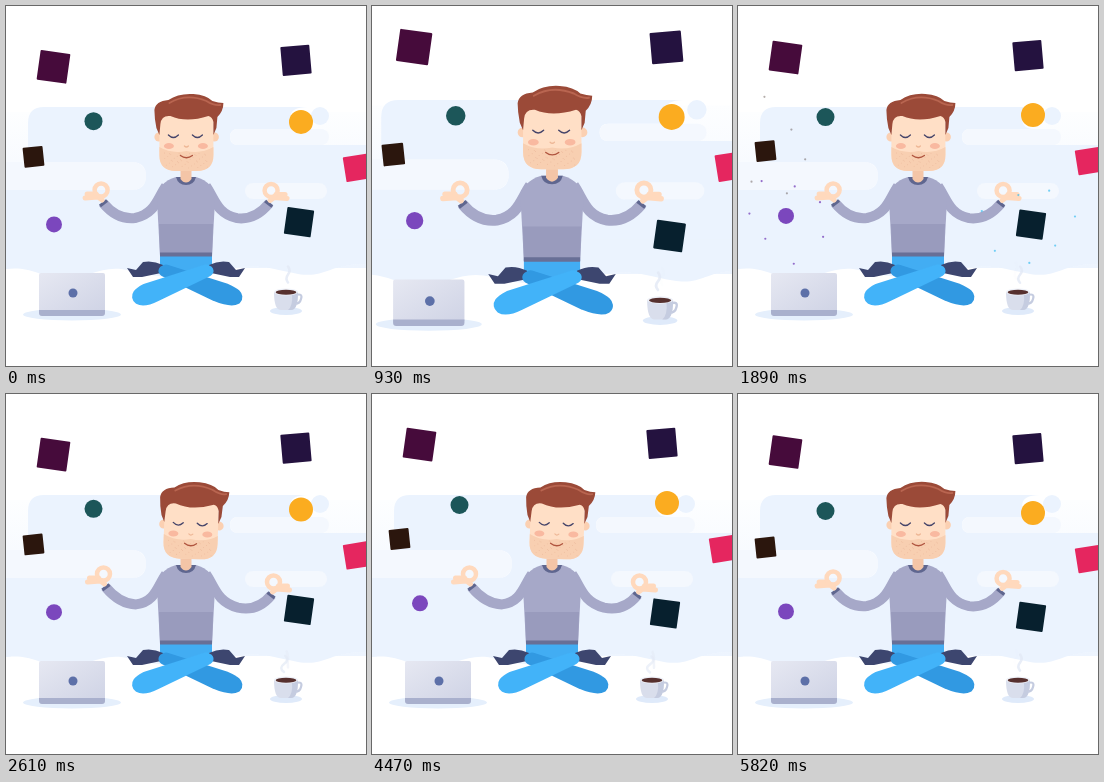
Write an HTML page that moves like this. It is 360 px wide and 360 px high and loops after 5850 ms.

```html
<!DOCTYPE html>
<html lang="en">
<head>
<meta charset="utf-8">
<title>Meditating designer</title>
<style>
  html, body { margin: 0; width: 100%; height: 100%; overflow: hidden; background: #fff; }
  svg { display: block; width: 100vw; height: 100vh; }
</style>
</head>
<body>
<svg viewBox="0 0 360 360" fill="none" stroke-linecap="round" stroke-linejoin="round">
  <defs>
    <linearGradient id="sky" x1="0" y1="0" x2="0" y2="1">
      <stop offset="0" stop-color="#fdfeff"/><stop offset="1" stop-color="#edf4fe"/>
    </linearGradient>
    <linearGradient id="metal" x1="0" y1="0" x2="1" y2="1">
      <stop offset="0" stop-color="#e6e8f2"/><stop offset="1" stop-color="#cfd3e5"/>
    </linearGradient>
  </defs>
  <g id="scene">
    <path fill="url(#sky)" d="M-180 106H540V262H-180Z"/>
    <g fill="#ebf3fe">
      <path d="M38 101H302Q284 101 284 112Q284 123 296 123H232Q224 123 224 131T232 139H360V232H0V184H126Q140 184 140 170T126 156H22V117Q22 101 38 101Z"/>
      <circle cx="314" cy="110" r="9"/>
      <path d="M-180 230H540V263Q390 255 350 258C320 261 318 272 292 268C265 263 250 256 222 263C190 270 160 275 125 265C95 257 83 274 55 272C32 270 24 260 0 263H-180Z"/>
    </g>
    <g fill="#f4f8fe">
      <rect x="224" y="123" width="99" height="16" rx="8"/>
      <rect x="-30" y="156" width="170" height="28" rx="14"/>
      <rect x="239" y="177" width="82" height="16" rx="8"/>
    </g>

    <ellipse cx="66" cy="308.5" rx="49" ry="6" fill="#e5effc"/>
    <rect x="33" y="267" width="66" height="40" rx="2" fill="url(#metal)"/>
    <path d="M33 304H99V307Q99 310 96 310H36Q33 310 33 307Z" fill="#a9b0cd"/>
    <circle cx="67" cy="287" r="4.5" fill="#5d70a8"/>

    <ellipse cx="280" cy="305" rx="16" ry="4" fill="#dfeafa"/>
    <g id="steam" stroke="#e2e9f5" stroke-width="2.5"><path/><path/></g>
    <path d="M290 289Q297 287 295 293Q294 298 288 298" stroke="#c5cce0" stroke-width="2.2"/>
    <path d="M268 286Q268 304 275 304H285Q292 304 292 286Z" fill="#d9deec"/>
    <path d="M286 288Q287 300 282 304H285Q292 304 292 286Z" fill="#c5cce0"/>
    <ellipse cx="280" cy="286" rx="12" ry="3.4" fill="#eef1f8"/>
    <ellipse cx="280" cy="286.3" rx="10.3" ry="2.5" fill="#56302e"/>

    <g id="legs">
      <path fill="#42adf3" d="M154 248H206V264Q194 272 180 274Q166 272 154 264Z"/>
      <g fill="#3d466f">
        <path id="shoe" d="M121 262L130 264L137 256Q147 254 157 259L155 267L136 271H127Z"/>
        <use href="#shoe" transform="matrix(-1 0 0 1 360 0)"/>
      </g>
      <path stroke="#3199e2" stroke-width="11" d="M160 264L220 283Q234 289 230 293Q225 296 210 290L158 265"/>
      <path stroke="#42b3f9" stroke-width="11" d="M200 264L140 283Q128 289 133 293Q138 296 150 290L202 265"/>
    </g>

    <g id="leftArm"></g>
    <g id="rightArm"></g>
    <path fill="#a6a8c8" d="M151 194Q152 176 170 171H190Q208 176 209 194L206 250H154Z"/>
    <path fill="#999bbd" d="M153 218H207L206 250H154Z"/>
    <path fill="#686f96" d="M154 246.5H206V250.5H154Z"/>
    <path fill="#5f668f" d="M170 171H190Q188 179 180 179T170 171Z"/>
    <path fill="#f4c5a7" d="M174.5 158H185.5V173Q183 176.5 180 176.5T174.5 173Z"/>

    <g id="head">
      <g fill="#fbd0b2"><circle cx="152.5" cy="131" r="4.5"/><circle cx="208" cy="131" r="4.5"/></g>
      <path fill="#ffdfc6" d="M153 108H207V149Q207 165 190 165H170Q153 165 153 149Z"/>
      <path fill="#f8cfb1" d="M153 141Q165 148 180 145Q195 148 207 141V149Q207 165 190 165H170Q153 165 153 149Z"/>
      <g id="stubble" fill="#e9b497"></g>
      <g fill="#f9b9a0"><ellipse cx="162.5" cy="140" rx="5" ry="3"/><ellipse cx="196.5" cy="140" rx="5" ry="3"/></g>
      <path fill="#9b4a38" d="M153 129L150 122Q148 112 148 104Q149 95 162 94Q172 87 187 88Q200 89 206 95Q212 97 217 97Q217 105 211 111L210 122L207 129V116Q206 111 202 110Q180 117 164 110Q155 109 154 118Z"/>
      <path stroke="#b96550" stroke-width="1.8" d="M163 97Q180 87 200 95Q208 100 214 99"/>
      <g stroke="#46456a" stroke-width="1.3">
        <path d="M162 129Q167 134 172 129M186 129Q191 134 196 129"/>
        <path stroke="#b0553f" d="M174 149.5Q180 154 186 149.5"/>
      </g>
      <path stroke="#eeb796" stroke-width="1.2" d="M178 140Q180 142 182 140"/>
    </g>
  </g>
  <g id="icons"></g>
  <g id="sparks"></g>
</svg>
<script>
const LOOP = 5850, FLOAT = 2650, INTRO = 1300;
const CENTER = { x: 180, y: 187 };
const byId = id => document.getElementById(id);
const clamp = v => Math.max(0, Math.min(1, v));
const mix = (a, b, k) => a + (b - a) * k;

function add(parent, tag, attrs) {
  const node = document.createElementNS("http://www.w3.org/2000/svg", tag);
  for (const key in attrs) node.setAttribute(key, attrs[key]);
  return parent.appendChild(node);
}

// Floating badges: height range, time of the lowest point, time of the spark burst
const badges = [
  { x: 47.5, top: 48, low: 61, peak: 2750, size: 30, turn: 8, color: "#460b3b", burst: 1980 },
  { x: 290, top: 49, low: 55, peak: 2950, size: 29, turn: -5, color: "#24123f", burst: 1330 },
  { x: 27.5, top: 145, low: 153.5, peak: 3150, size: 20, turn: -6, color: "#2b160d", burst: 1500 },
  { x: 87.5, top: 111, low: 117, peak: 3150, size: 18, round: true, color: "#1c5659", burst: 1150 },
  { x: 295, top: 109, low: 119, peak: 3150, size: 24, round: true, color: "#fbac20", burst: 1250 },
  { x: 48, top: 208, low: 219, peak: 2850, size: 16, round: true, color: "#7b47bd", burst: 1620 },
  { x: 351, top: 155, low: 165, peak: 3150, size: 25, turn: -9, color: "#e5265f", burst: 1400 },
  { x: 293, top: 215, low: 227, peak: 3700, size: 27, turn: 8, color: "#07202e", spark: "#35bdf0", burst: 1580 }
];
for (const b of badges) {
  const half = b.size / 2;
  b.node = b.round
    ? add(byId("icons"), "circle", { r: half, fill: b.color })
    : add(byId("icons"), "rect", { x: -half, y: -half, width: b.size, height: b.size, rx: 1, fill: b.color });
  b.sparks = Array.from({ length: 7 }, () =>
    add(byId("sparks"), "circle", { r: 1.1, fill: b.spark || b.color }));
}

for (let i = 0; i < 46; i++) {
  add(byId("stubble"), "circle", {
    cx: 158 + (i * 17.3) % 44, cy: 147 + (i * 7.7) % 15, r: 0.45
  });
}

function buildArm(group) {
  return {
    sleeve: add(group, "path", { stroke: "#a6a8c8", "stroke-width": 10, "stroke-linecap": "butt" }),
    cuff: add(group, "path", { stroke: "#5f668f", "stroke-width": 9, "stroke-linecap": "butt" }),
    hand: [
      add(group, "path", { stroke: "#ffd9bd", "stroke-width": 5 }),
      add(group, "circle", { r: 6.5, stroke: "#ffd9bd", "stroke-width": 4.5 })
    ]
  };
}
const leftArm = buildArm(byId("leftArm"));
const rightArm = buildArm(byId("rightArm"));

// Drawn for the left side; side = -1 mirrors it around the body axis
function poseArm(arm, side, dx, dy) {
  const px = x => side > 0 ? x : 360 - x;
  const hx = (x, k = 1) => px(x) + dx * k;
  const hy = (y, k = 1) => y + dy * k;
  arm.sleeve.setAttribute("d",
    `M${px(160)} 180C${px(151)} 193 ${px(149)} 208 ${hx(129, .4)} ${hy(212, .4)}Q${hx(111)} ${hy(214)} ${hx(97)} ${hy(197)}`);
  arm.cuff.setAttribute("d", `M${hx(98.4)} ${hy(198.6)}L${hx(96.4)} ${hy(196)}`);
  arm.hand[0].setAttribute("d",
    `M${hx(96)} ${hy(194)}L${hx(92)} ${hy(191)}L${hx(79)} ${hy(192)}M${hx(90)} ${hy(188)}L${hx(81)} ${hy(188)}`);
  arm.hand[1].setAttribute("cx", hx(95));
  arm.hand[1].setAttribute("cy", hy(184));
}

const swayKeys = [[0, .2], [1750, .15], [2650, 1], [3550, 0], [4500, 1], [5500, .1], [5850, .2]];
function swayAt(t) {
  const i = swayKeys.findIndex(key => key[0] > t);
  const [t0, a] = swayKeys[i - 1], [t1, b] = swayKeys[i];
  const k = (t - t0) / (t1 - t0);
  return mix(a, b, (1 - Math.cos(Math.PI * k)) / 2);
}

function zoomAt(t) {
  return t < 30 ? 1 : 1 + Math.max(0, 1 - t / INTRO) ** 2;
}

function drawBadges(t, zoom) {
  const spread = 1 + (zoom - 1) * .5;
  badges.forEach((b, n) => {
    const k = (1 + Math.cos(2 * Math.PI * (t - b.peak) / FLOAT)) / 2;
    const x = CENTER.x + (b.x - CENTER.x) * spread;
    const y = CENTER.y + (mix(b.top, b.low, k) - CENTER.y) * zoom;
    b.node.setAttribute("transform", `translate(${x} ${y}) rotate(${b.turn || 0}) scale(${zoom})`);

    const life = (t - b.burst) / 450;
    b.sparks.forEach((spark, i) => {
      const active = life > 0 && life < 1;
      const angle = i * 2 * Math.PI / 7 + n;
      const reach = 14 + (20 + i * 5 % 4 * 7) * (1 - (1 - clamp(life)) ** 2);
      spark.setAttribute("cx", x + Math.cos(angle) * reach);
      spark.setAttribute("cy", y + Math.sin(angle) * reach);
      spark.setAttribute("opacity", active ? 1 - life ** 3 : 0);
    });
  });
}

function drawSteam(t) {
  [...byId("steam").children].forEach((wisp, i) => {
    const phase = (t / 1950 + i / 2) % 1;
    const y = 281 - phase * 9, bend = 3 * Math.sin(2 * Math.PI * phase);
    const x = 278 + i * 4;
    wisp.setAttribute("d", `M${x} ${y}q${-3 - bend} -4 0 -8t${bend / 2} -8`);
    wisp.setAttribute("opacity", Math.sin(Math.PI * phase) * .8);
  });
}

function render(t) {
  const zoom = zoomAt(t), sway = swayAt(t);
  byId("scene").setAttribute("transform",
    `translate(${CENTER.x} ${CENTER.y}) scale(${zoom}) translate(${-CENTER.x} ${-CENTER.y})`);
  byId("head").setAttribute("transform",
    `translate(${mix(-.5, 4, sway)} 0) rotate(${mix(-.5, 2, sway)} 180 165)`);
  poseArm(leftArm, 1, mix(-.5, 2.5, sway), mix(1, -4, sway));
  poseArm(rightArm, -1, mix(-.5, 2.5, sway), mix(-.5, 4, sway));
  drawBadges(t, zoom);
  drawSteam(t);
}

let start;
function frame(now) {
  start ??= now;
  render((now - start) % LOOP);
  requestAnimationFrame(frame);
}
render(0);
requestAnimationFrame(frame);
</script>
</body>
</html>
```
